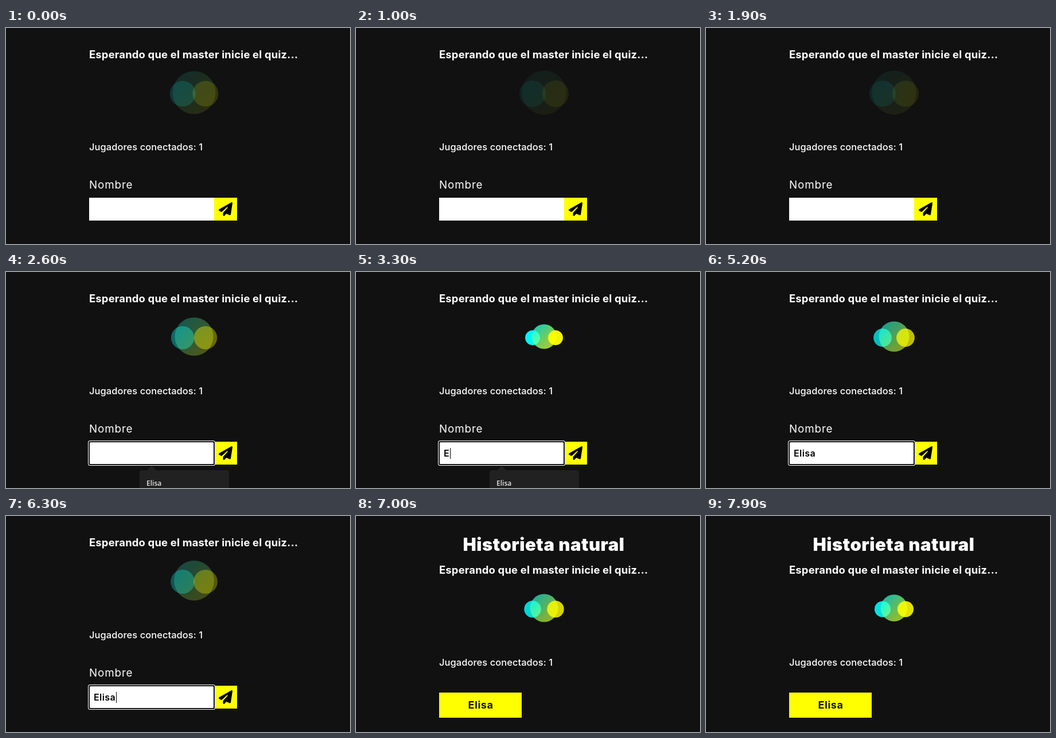
These frames come from a looping animation (600x378 px, 8000 ms). An HTML page:

```html
<!DOCTYPE html>
<html lang="es">
<head>
<meta charset="utf-8">
<title>Sala de espera</title>
<style>
  html, body { margin: 0; width: 100%; height: 100%; overflow: hidden; background: #111; }
  svg { display: block; width: 100%; height: 100%; }
  text { font-family: Inter, sans-serif; fill: #fff; white-space: pre; }
  .title { font-size: 31px; font-weight: 900; letter-spacing: .55px; text-anchor: middle; }
  .wait { font-size: 18.4px; font-weight: 700; letter-spacing: .2px; }
  .count { font-size: 16.4px; font-weight: 500; letter-spacing: .1px; }
  .label { font-size: 18.8px; font-weight: 400; letter-spacing: .9px; }
  .typed { font-size: 16px; font-weight: 600; letter-spacing: .4px; fill: #000; }
  .player { font-size: 18px; font-weight: 700; letter-spacing: .6px; text-anchor: middle; fill: #111; }
  .option { font: 600 12px "Open Sans", sans-serif; fill: #e4e4e4; }
</style>
</head>
<body>
<svg viewBox="0 0 600 378">
  <defs>
    <linearGradient id="mix" x1="0" y1="0" x2="1" y2="1">
      <stop offset="0" stop-color="#0ff"/>
      <stop offset="1" stop-color="#ff0"/>
    </linearGradient>
  </defs>
  <rect width="600" height="378" fill="#111"/>

  <g id="lobby">
    <text class="wait" x="145" y="53">Esperando que el master inicie el quiz...</text>
    <g id="loader">
      <circle id="left" cx="308" cy="115" fill="#0ff"/>
      <circle id="main" cx="328" cy="113" fill="url(#mix)" fill-opacity=".82"/>
      <circle id="right" cx="348" cy="115" fill="#ff0"/>
    </g>
    <text class="count" x="145" y="214">Jugadores conectados: 1</text>
  </g>

  <g id="form">
    <text class="label" x="145" y="281">Nombre</text>
    <rect x="145" y="297" width="218" height="40" fill="#fff"/>
    <rect x="363" y="297" width="40" height="40" fill="#ff0"/>
    <path transform="translate(371 305) scale(.047)" d="M498.1 5.6c10.1 7 15.4 19.1 13.5 31.2l-64 416c-1.5 9.7-7.4 18.2-16 23s-18.9 5.4-28 1.6L284 427.7l-68.5 74.1c-8.9 9.7-22.9 12.9-35.2 8.1S160 493.2 160 480V396.4c0-4 1.5-7.8 4.2-10.7L331.8 202.8c5.8-6.3 5.6-16-.4-22s-15.7-6.4-22-.7L106 360.8 17.7 316.6C7.1 311.3 .3 300.7 0 288.9s5.9-22.8 16.1-28.7l448-256c10.7-6.1 23.9-5.5 34 1.4z"/>
    <g id="focus">
      <rect x="143" y="295" width="222" height="44" rx="3.5" fill="#fff"/>
      <rect x="144" y="296" width="220" height="42" rx="2.5" fill="#101010"/>
      <rect x="146" y="298" width="216" height="38" rx="1.5" fill="#fff"/>
    </g>
    <text id="typed" class="typed" x="153" y="323"></text>
    <rect id="caret" y="308" width="1" height="19"/>
    <g id="menu">
      <path d="M245 347.5L254 339.5L263 347.5Z" fill="#212121"/>
      <rect x="233" y="347" width="156" height="40" rx="4" fill="#212121"/>
      <text class="option" x="245" y="374">Elisa</text>
    </g>
  </g>

  <g id="joined">
    <text class="title" x="327.5" y="61">Historieta natural</text>
    <rect x="145" y="309" width="144" height="44" fill="#ff0"/>
    <text class="player" x="217.5" y="337">Elisa</text>
  </g>
</svg>
<script>
const LOOP = 8000, PULSE = 915, GROW = 705, PULSE_START = 3290;
const FOCUS = 2100, MENU_END = 4400, JOIN = 6700;
const NAME = 'Elisa';
const KEYS = [3200, 3400, 3500, 3600, 4400];
const CARET = [[2100, 2600], [3100, 4100], [4400, 4900], [5400, 5800], [6300, 6700]];

const $ = id => document.getElementById(id);
const show = (id, on) => $(id).setAttribute('visibility', on ? 'inherit' : 'hidden');
const within = (t, [from, to]) => t >= from && t < to;

function drawLoader(t) {
  const phase = ((t - PULSE_START) % PULSE + PULSE) % PULSE;
  const rest = Math.max(0, 1 - phase / GROW);
  const r = 39.5 - 18.8 * rest ** 3;
  $('main').setAttribute('r', r);
  $('left').setAttribute('r', r * .6);
  $('right').setAttribute('r', r * .6);
  for (const id of ['left', 'main', 'right']) $(id).setAttribute('opacity', rest ** 2.6);
}

function drawInput(t) {
  const typed = $('typed');
  const text = NAME.slice(0, KEYS.filter(k => t >= k).length);
  if (typed.textContent !== text) typed.textContent = text;
  const width = text ? typed.getComputedTextLength() : 0;
  $('caret').setAttribute('x', Math.round(153.5 + width));
  show('caret', CARET.some(span => within(t, span)));
  show('focus', t >= FOCUS);
  show('menu', within(t, [FOCUS, MENU_END]));
}

function draw(t) {
  const joined = t >= JOIN;
  $('lobby').setAttribute('transform', `translate(0 ${joined ? 48 : 0})`);
  $('form').setAttribute('display', joined ? 'none' : 'inline');
  $('joined').setAttribute('display', joined ? 'inline' : 'none');
  drawLoader(t);
  if (!joined) drawInput(t);
}

const start = performance.now();
function tick() {
  draw((performance.now() - start) % LOOP);
  requestAnimationFrame(tick);
}
tick();
</script>
</body>
</html>
```
